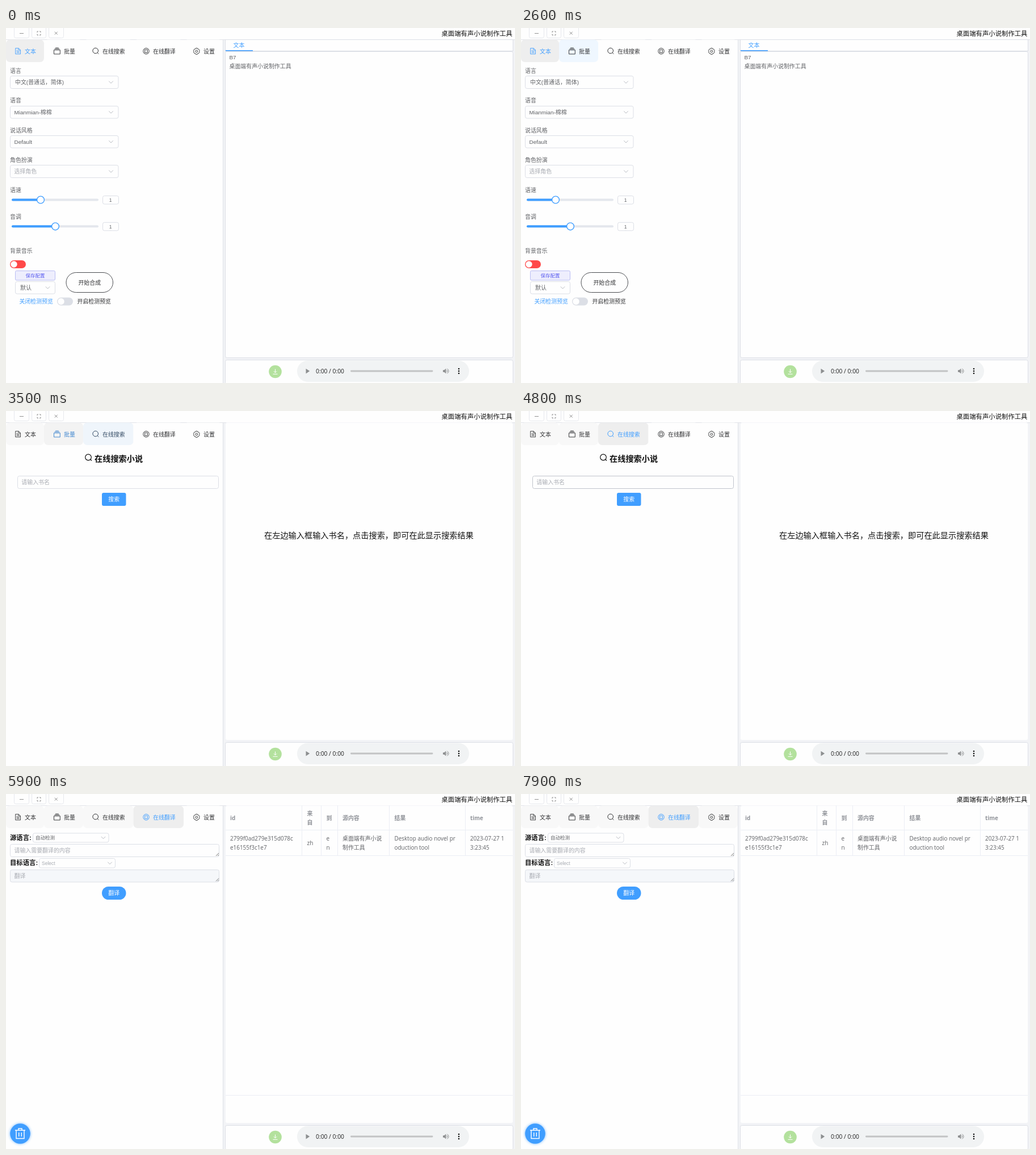
An HTML page for the animation above (8 s loop, 897 px wide and 625 px high).

```html
<!DOCTYPE html>
<html lang="zh-CN">
<head>
<meta charset="utf-8">
<style>
html, body { margin: 0; width: 100%; height: 100%; overflow: hidden; background: #fff; }
svg { display: block; width: 897px; height: 625px; }
text { font-family: "Liberation Sans", "Noto Sans CJK SC", "Noto Sans CJK", sans-serif; white-space: pre; }
.ui { font-family: "Open Sans", "Noto Sans CJK SC", "Noto Sans CJK", sans-serif; }
</style>
</head>
<body>
<svg id="stage" viewBox="0 0 897 625" xmlns="http://www.w3.org/2000/svg"></svg>
<script>
const LOOP = 8000, STEP = 100;
const BLUE = '#409eff', INK = '#303133', BODY = '#606266', MUTED = '#a8abb2', HEAD = '#909399';
const EDGE = '#dcdfe6', LINE = '#ebeef5', PAPER = '#fefefe';
const BASE = 9.94, SMALL = 8.52, LARGE = 11.36, TITLE = 14.2;
const COMMA = '\uff0c';

// Markup helpers; text is placed by its vertical centre.
const text = (x, y, s, { size = BASE, fill = BODY, more = '' } = {}) =>
  `<text x="${x}" y="${y + size * 0.37}" font-size="${size}" fill="${fill}" ${more}>${s}</text>`;
const centred = (x, y, s, o = {}) => text(x, y, s, { ...o, more: 'text-anchor="middle" ' + (o.more || '') });
const fillBox = (x, y, x2, y2, fill, r = 0, more = '') =>
  `<rect x="${x}" y="${y}" width="${x2 - x}" height="${y2 - y}" rx="${r}" fill="${fill}" ${more}/>`;
const box = (x, y, x2, y2, { fill = PAPER, stroke = EDGE, r = 3, more = '' } = {}) =>
  fillBox(x + .5, y + .5, x2 - .5, y2 - .5, fill, r, `stroke="${stroke}" ${more}`);
const path = (d, stroke, width = 1, more = '') =>
  `<path d="${d}" fill="none" stroke="${stroke}" stroke-width="${width}" ${more}/>`;
const dot = (x, y, r, fill, more = '') => `<circle cx="${x}" cy="${y}" r="${r}" fill="${fill}" ${more}/>`;
const group = (id, ...parts) => `<g id="${id}">${parts.join('')}</g>`;
const chevron = (x, y) => path(`M${x - 3.7} ${y - 2}l3.7 3.8 3.7 -3.8`, '#b2b5bc', .9);
const select = (x, y, x2, y2, s, inset, o) =>
  box(x, y, x2, y2) + text(x + inset, (y + y2) / 2, s, o) + chevron(x2 - (y2 - y < 20 ? 10 : 13.5), (y + y2) / 2);
const button = (x, y, x2, y2, s, { fill = BLUE, r = 3 } = {}) =>
  fillBox(x, y, x2, y2, fill, r) + centred((x + x2) / 2, (y + y2) / 2 - .5, s, { fill: '#fff' });
const toggle = (x, y, fill, on = false, id = '') =>
  `<g ${id && `id="${id}"`}>${fillBox(x, y - 7, x + 28, y + 7, fill, 7)}${dot(x + (on ? 21 : 7), y, 5.7, '#fff')}</g>`;
const magnifier = (x, y, r, w) =>
  `<circle cx="${x}" cy="${y}" r="${r}" fill="none" stroke="currentColor" stroke-width="${w}"/>` +
  path(`M${x + r * .7} ${y + r * .7}l2.3 2.3`, 'currentColor', w);
const table = (xs, ys) =>
  xs.map(x => path(`M${x + .5} ${ys[0]}V${ys[ys.length - 1]}`, LINE)).join('') +
  ys.slice(1).map(y => path(`M387 ${y - .5}H893`, LINE)).join('');
const heads = (y, cells) => cells.map(([x, s, dy = 0]) =>
  text(x, y + dy, s, { fill: HEAD, more: 'class="ui" font-weight="700"' })).join('');

const icons = [
  path('M16.7 35.6h5.6l3.2 3.2v7h-8.8zM22 35.6v3.4h3.5M18.7 39.2h1.8M18.7 41.2h5M18.7 43.3h5', 'currentColor', .9),
  path('M84.5 38.7h10.8v7.2H84.5zM85.5 36.8h8.8M87 35h5.8', 'currentColor', .95),
  magnifier(157.7, 40, 4.8, 1),
  '<g fill="none" stroke="currentColor" stroke-width=".95"><circle cx="247" cy="40.7" r="5.2"/><circle cx="247" cy="40.7" r="2.7"/></g>' +
    path('M243.5 37.2l1.5 1.5M250.5 37.2l-1.5 1.5M243.5 44.2l1.5 -1.5M250.5 44.2l-1.5 -1.5', 'currentColor', .9),
  path('M334.3 35.5h3l.7 1.6 1.8.2 1.4 2.5-1 1.1 1 1.1-1.4 2.5-1.8.2-.7 1.6h-3l-.7-1.6-1.8-.2-1.4-2.5 1-1.1-1-1.1 1.4-2.5 1.8-.2z', 'currentColor', .9) +
    '<circle cx="335.8" cy="40.9" r="1.9" fill="none" stroke="currentColor" stroke-width=".9"/>'
];
const menu = [['文本', 0, 67, 33], ['批量', 67, 136, 102], ['在线搜索', 136, 224.5, 170],
  ['在线翻译', 224.5, 313, 259], ['设置', 313, 382, 348]].map(([label, x, x2, tx], i) =>
  `<g id="item${i}">${fillBox(x, 20.5, x2, 60, PAPER, 7)}${icons[i]}${text(tx, 41, label, { fill: 'currentColor' })}</g>`).join('');

const frame = [
  fillBox(0, 0, 897, 625, PAPER), fillBox(382, 20, 897, 625, '#f2f3f6'),
  path('M0 20.5H897', '#e0e2e8'), path('M382.5 20V625', '#dfe2e8'),
  ...[[14, 41], [45, 71], [75, 102]].map(([a, b]) => box(a, -4, b, 18, { stroke: '#e6e8ed' })),
  path('M24 9.5h7M85.8 6.6l5 5M90.8 6.6l-5 5', '#777', .8),
  path('M55 8v-2h2M59 6h2v2M61 10.5v2h-2M57 12.5h-2v-2', '#777', .8),
  text(767.5, 10, '桌面端有声小说制作工具', { size: LARGE, fill: '#111' })
].join('');

const slider = (y, x) => fillBox(10, y - 2, 163, y + 2, '#e4e7ed', 2) + fillBox(10, y - 2, x, y + 2, BLUE, 2) +
  dot(x, y, 6.4, '#fff', `stroke="${BLUE}" stroke-width="1.4"`) +
  box(170, y - 7.5, 199, y + 8) + centred(184, y + .5, '1', { size: SMALL });
const option = (y, left, sx, rx, right) =>
  text(23.5, y, left, { fill: BLUE }) + toggle(sx, y, EDGE) + text(rx, y, right, { fill: INK });

const form = group('form',
  [['语言', 75], ['语音', 127.5], ['说话风格', 180], ['角色扮演', 232], ['语速', 285], ['音调', 332], ['背景音乐', 392]]
    .map(([s, y]) => text(7, y, s)).join(''),
  select(7, 84, 198.5, 107, `中文(普通话${COMMA}简体)`, 9),
  select(7, 137, 198.5, 159.5, 'Mianmian-棉棉', 7.5),
  select(7, 189, 198.5, 211.5, 'Default', 7.5),
  select(7, 241, 198.5, 264, '选择角色', 7.5, { fill: MUTED }),
  slider(302.5, 61), slider(349.3, 87),
  toggle(7, 416, '#ff4949'),
  box(16, 427, 87, 444.5, { fill: '#eeeefd', stroke: '#b9bdf3', r: 2 }),
  centred(51.5, 435.8, '保存配置', { size: SMALL, fill: '#5a5cf0' }),
  select(16, 446, 87, 468.5, '默认', 9),
  box(105.5, 430, 189, 466, { stroke: '#4a4c50', r: 17.5 }), centred(147.3, 448, '开始合成', { fill: INK }),
  text(23.5, 481.5, '关闭检测预览', { more: 'id="offLabel"' }),
  toggle(90, 481.5, EDGE, false, 'preview'),
  text(125.5, 481.5, '开启检测预览', { more: 'id="onLabel"' }),
  group('extras', option(505.3, '普通检测', 70.5, 106, '快速检测'), option(529, '短文本模式', 80.3, 115.5, '长文本模式')));

const editor = group('editor',
  box(386, 20, 894, 41, { r: 0 }), text(400.5, 30, '文本', { fill: BLUE }),
  fillBox(387, 39, 435, 40.6, BLUE),
  group('resultTab', text(449, 30, '检测结果', { fill: INK })),
  box(386, 41, 894, 581), text(393.5, 51.5, 'B7'), text(393.5, 67, '桌面端有声小说制作工具'));

const plainPanel = group('plainPanel', box(386, 20, 894, 580, { stroke: '#f4f5f8' }));

const batch = group('batch', table([], [20, 46, 92, 531]),
  heads(33, [[395, '文件名'], [540, '文件路径'], [687, '字数'], [757, '状态']]),
  centred(637, 69, '暂无数据', { fill: HEAD }),
  button(483, 536, 545, 558.5, '选择文件'), button(745, 543, 797.5, 565.5, '清空', { fill: '#e6a23c' }));

const search = group('search',
  `<g color="#111">${magnifier(145, 81.5, 5.3, 1.2)}</g>`,
  text(156, 84, '在线搜索小说', { size: TITLE, fill: '#111', more: 'font-weight="700"' }),
  box(20, 114, 375, 137, { more: 'id="bookInput"' }), text(27.3, 125.5, '请输入书名', { fill: MUTED }),
  fillBox(27.3, 119.5, 28.3, 131.5, INK, 0, 'id="caret"'),
  button(169, 144, 211.5, 167, '搜索'),
  text(455, 219, ['在左边输入框输入书名', '点击搜索', '即可在此显示搜索结果'].join(COMMA), { size: TITLE, fill: '#111' }));

const bold = { size: LARGE, fill: '#111', more: 'font-weight="700"' };
const grip = y => path(`M370 ${y}l5 -5M373 ${y}l2 -2`, '#555', .8);
const cell = (x, y, ...rows) => rows.map((s, i) => text(x, y + i * 16.2, s, { more: 'class="ui"' })).join('');
const translate = group('translate',
  text(7, 76.5, '源语言:', bold), select(47, 68.5, 181.5, 85.5, '自动检测', 5, { size: SMALL }),
  box(7, 88, 376, 111), text(14.5, 99.5, '请输入需要翻译的内容', { fill: MUTED }), grip(109),
  text(7, 121, '目标语言:', bold), select(58, 113, 193, 130.5, 'Select', 5, { size: SMALL, fill: MUTED }),
  box(7, 133, 376, 155.5, { fill: '#f5f7fa' }), text(14.5, 144.5, '翻译', { fill: MUTED }), grip(153.5),
  button(169, 163, 211.5, 186, '翻译', { r: 11.5 }),
  dot(25, 598, 18.5, BLUE, 'opacity=".55" filter="url(#glow)"'), dot(25, 598, 17.8, BLUE),
  path('M16 592h18M22 591.5v-2.5h6v2.5M18 592.5v14h14v-14M22.7 596v7M27.3 596v7', '#fff', 1.4),
  table([521, 555, 584, 675, 809], [20, 64, 109]), path('M387 530.5H893', LINE),
  heads(42, [[395, 'id'], [530.5, '来', -8], [530.5, '自', 8], [564.5, '到'], [593, '源内容'], [684.5, '结果'], [818, 'time']]),
  cell(395, 78, '2799f0ad279e315d078c', 'e16155f3c1e7'), cell(530.5, 86, 'zh'), cell(564.5, 78, 'e', 'n'),
  cell(593, 78, '桌面端有声小说', '制作工具'), cell(684.5, 78, 'Desktop audio novel pr', 'oduction tool'),
  cell(818, 78, '2023-07-27 1', '3:23:45'));

const settings = group('settings',
  text(156, 343.5, '暂无更多配置', { size: LARGE, fill: '#222' }),
  text(400, 40, '下载路径'), box(400, 53, 699, 75.5), text(405, 64.5, 'D:\\desktop', { size: SMALL }),
  button(698, 53, 733.5, 75, '确认'),
  text(400, 89, '自动播放(仅单文本模式)'), toggle(400.5, 114, BLUE, true),
  centred(408.5, 114, '是', { size: SMALL, fill: '#fff' }),
  text(400, 139, `最大重试次(转换出现异常时进行异常重试${COMMA}按需设置)`),
  box(400, 152, 734, 175, { fill: '#f5f7fa' }), box(400, 152, 694, 175), text(405, 163.5, '3', { size: SMALL }),
  centred(713.5, 163.5, '确认', { size: SMALL, fill: HEAD }),
  text(400, 188, '自定义敏感词'), box(400, 202, 734, 273),
  button(407, 279.5, 469.5, 302.5, '保存配置'), button(477, 279.5, 539, 302.5, '获取配置'));

const player = group('player',
  box(386, 584, 894, 628), dot(474.5, 605, 11.3, '#b3e19d'),
  path('M474.5 600.5v6M471.8 604.2l2.7 2.7 2.7 -2.7M470.5 609.3h8', '#fff', 1),
  fillBox(513, 585.5, 816, 623, '#f1f3f4', 18.7),
  '<path d="M528.5 599.8v8.6l6.7 -4.3z" fill="#8d8f90"/>',
  text(546, 604, '0:00 / 0:00', { size: 10.3, fill: '#222', more: 'class="ui"' }),
  fillBox(607, 602.6, 752.5, 605.4, '#c2c3c4', 1.4),
  '<path d="M770 602.3h2.3l3 -2.8v9l-3 -2.8h-2.3z" fill="#8d8f90"/>',
  path('M776.8 601.8q2 2.2 0 4.4M777.5 599.7q5.3 4.3 0 8.6', '#8d8f90', 1),
  [600, 604, 608].map(y => dot(798, y, 1.3, '#111')).join(''));

const stage = document.getElementById('stage');
stage.innerHTML = '<defs><filter id="glow" x="-50%" y="-50%" width="200%" height="200%"><feGaussianBlur stdDeviation="2.2"/></filter></defs>' +
  frame + editor + plainPanel + batch + form + search + translate + settings + menu + player;

const $ = id => document.getElementById(id);
const show = (id, on) => $(id).setAttribute('visibility', on ? 'inherit' : 'hidden');
const clamp = v => Math.max(0, Math.min(1, v));
const rgb = hex => [1, 3, 5].map(i => parseInt(hex.slice(i, i + 2), 16));
const mix = (a, b, k) => {
  const end = rgb(b);
  return `rgb(${rgb(a).map((v, i) => Math.round(v + (end[i] - v) * k))})`;
};

const HOVER = '#eff7ff', ACTIVE = '#eeeeee', VISITED = '#f8f8f8';
const visits = [
  { item: 0, page: 'text', hover: -2000, from: -2000, to: 2700 },
  { item: 1, page: 'batch', hover: 2600, from: 2700, to: 3500 },
  { item: 2, page: 'search', hover: 3500, from: 3500, to: 5600 },
  { item: 3, page: 'translate', hover: 5500, from: 5600, to: 6700 },
  { item: 4, page: 'settings', hover: 6700, from: 6700, to: 7400 },
  { item: 3, page: 'translate', hover: 7400, from: 7400, to: 9000 }
];
const ramp = ms => clamp((ms + 60) / 250);

function paintMenu(t) {
  for (let i = 0; i < 5; i++) {
    let fill = PAPER, ink = 0;
    for (const v of visits) {
      if (v.item !== i || t < v.hover) continue;
      if (t < v.from) fill = HOVER;
      else if (t < v.to) {
        ink = ramp(t - v.from);
        fill = mix(HOVER, ACTIVE, ink);
      } else {
        const gone = ramp(t - v.to);
        ink = 1 - gone;
        fill = mix(ACTIVE, VISITED, Math.sqrt(gone));
      }
    }
    const item = $('item' + i);
    item.firstChild.setAttribute('fill', fill);
    item.setAttribute('color', mix(INK, BLUE, ink));
  }
}

function paintPreview(t) {
  const k = t < 1900 ? clamp((t - 1000) / 300) : 1 - clamp((t - 1800) / 300);
  const on = k * k * (3 - 2 * k), open = t >= 1000 && t < 1900;
  const [track, knob] = $('preview').children;
  track.setAttribute('fill', mix(EDGE, BLUE, on));
  knob.setAttribute('cx', 97 + 14 * on);
  $('offLabel').setAttribute('fill', mix(BLUE, INK, on));
  $('onLabel').setAttribute('fill', mix(INK, BLUE, on));
  show('extras', open);
  show('resultTab', open);
}

function render(t) {
  const { page } = visits.find(v => t >= v.from && t < v.to);
  show('form', page === 'text' || page === 'batch');
  show('editor', page === 'text');
  show('plainPanel', page !== 'text');
  for (const id of ['batch', 'search', 'translate', 'settings']) show(id, page === id);
  $('player').setAttribute('transform', `translate(0 ${page === 'text' ? 0 : -1})`);
  paintPreview(t);
  paintMenu(t);
  const focus = clamp((t - 5000) / 200);
  $('bookInput').setAttribute('stroke', t < 4800 ? EDGE : mix('#c0c4cc', BLUE, focus));
  show('caret', page === 'search' && t >= 5100);
}

const start = performance.now();
function tick() {
  const t = (performance.now() - start) % LOOP;
  render(Math.floor(t / STEP) * STEP);
  requestAnimationFrame(tick);
}
tick();
</script>
</body>
</html>
```
